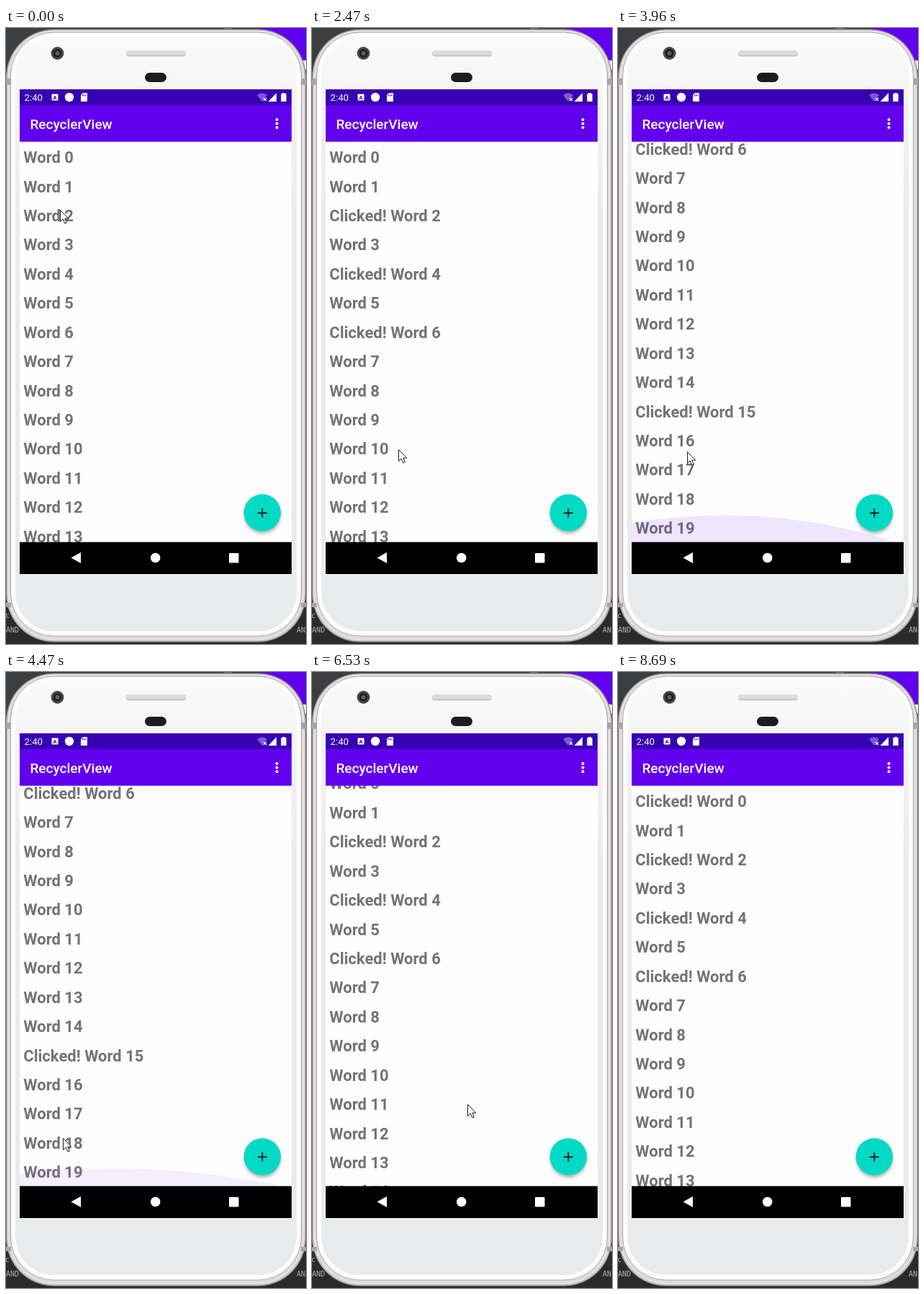
These frames come from a looping animation (417x854 px, 9280 ms). An HTML page:

```html
<!DOCTYPE html>
<html lang="en">
<head>
<meta charset="utf-8">
<title>RecyclerView</title>
<style>
  html, body { margin: 0; width: 100%; height: 100%; overflow: hidden; background: #2b2b2b; }
  svg { display: block; width: 417px; height: 854px; font-family: Roboto, sans-serif; }
  .row { font-size: 22px; font-weight: 700; fill: #737373; }
  .console { font: 10px "DejaVu Sans Mono", monospace; fill: #a9b0b6; }
</style>
</head>
<body>
<svg viewBox="0 0 417 854">
  <defs>
    <linearGradient id="face" x1="0" y1="0" x2="0" y2="1">
      <stop offset="0" stop-color="#fafafa"/>
      <stop offset=".1" stop-color="#f4f4f4"/>
      <stop offset=".3" stop-color="#e9ebec"/>
      <stop offset="1" stop-color="#e8eaeb"/>
    </linearGradient>
    <clipPath id="listArea"><rect x="19" y="157" width="378" height="556"/></clipPath>
    <filter id="blur" x="-30%" y="-30%" width="160%" height="160%"><feGaussianBlur stdDeviation="2.2"/></filter>
  </defs>

  <!-- desktop behind the phone -->
  <rect width="417" height="854" fill="#2b2b2b"/>
  <rect width="417" height="100" fill="#3c3f41"/>
  <rect x="353" width="64" height="45" fill="#6200ee"/>
  <rect x="405" y="45" width="12" height="13" fill="#fafafa"/>
  <g class="console">
    <text x="-1" y="818">c</text><text x="0" y="838">AND</text><text x="404" y="838">AN</text>
  </g>

  <!-- phone body -->
  <rect x="303" y="0" width="11" height="6" fill="#6d6969"/>
  <rect x=".5" y="2" width="416" height="849" rx="66" fill="#c9c4c4" stroke="#817c7c"/>
  <rect x="3" y="4" width="411" height="844" rx="64" fill="#dfdbdb" stroke="#f2efef"/>
  <path d="M0 70H7V79H0zM410 70H417V79H410zM0 797H7V803H0zM410 797H417V803H410z" fill="#aaa5a5"/>
  <rect x="6.5" y="6" width="404" height="837" rx="60" fill="#fdfdfd" stroke="#aaa6a6"/>
  <rect x="13" y="11" width="391" height="825" rx="54" fill="url(#face)"/>
  <circle cx="71.5" cy="35" r="9" fill="#4a4a4c"/>
  <circle cx="71.5" cy="35" r="6" fill="#1f2023"/>
  <circle cx="71.5" cy="35" r="3" fill="#56616c"/>
  <rect x="167" y="31.5" width="83" height="8" rx="4" fill="#c4c5c6"/>
  <rect x="167.5" y="32" width="82" height="5.5" rx="2.7" fill="#dcddde"/>
  <rect x="193" y="62" width="30" height="13" rx="6.5" fill="#1e1b20"/>

  <!-- list -->
  <rect x="19" y="157" width="378" height="556" fill="#fefefe"/>
  <g clip-path="url(#listArea)">
    <g id="list"></g>
    <path id="bottomGlow" fill="#6200ee"/>
    <path id="topGlow" fill="#6200ee"/>
  </g>

  <!-- status bar -->
  <rect x="19" y="85" width="378" height="22" fill="#3700b3"/>
  <g fill="#fff">
    <text x="25.6" y="101" font-size="13.2">2:40</text>
    <rect x="63.5" y="91.5" width="9" height="9" rx="1"/>
    <text x="68" y="99" font-size="8" font-weight="700" text-anchor="middle" fill="#3700b3">A</text>
    <circle cx="88" cy="96" r="6.2"/>
    <path d="M107 90H112Q113 90 113 91V101Q113 102 112 102H105Q104 102 104 101V93z"/>
    <path d="M106.5 92v2.5M108.7 92v2.5M110.9 92v2.5" stroke="#3700b3"/>
    <path d="M349 93Q356 87.5 363 93L356 102z" opacity=".35"/>
    <path d="M358 97l4 4m0-4l-4 4" stroke="#fff" stroke-width="1.2"/>
    <path d="M376 90V102H364.5z"/>
    <path d="M384 90h4v1.3h1.7V102h-7.4V91.3H384z"/>
  </g>

  <!-- app bar -->
  <rect x="19" y="107" width="378" height="50.7" fill="#6200ee"/>
  <text x="33.4" y="139.7" font-size="19" font-weight="500" fill="#fff">RecyclerView</text>
  <g fill="#fff">
    <circle cx="376.5" cy="127" r="2"/><circle cx="376.5" cy="132.5" r="2"/><circle cx="376.5" cy="138" r="2"/>
  </g>

  <!-- add button -->
  <circle cx="356.5" cy="675.5" r="25.5" opacity=".28" filter="url(#blur)"/>
  <circle cx="356.3" cy="672" r="25.8" fill="#03dac6"/>
  <path d="M349.9 672.3h12.8M356.3 665.9v12.8" stroke="#111" stroke-width="1.8"/>

  <!-- navigation bar -->
  <rect x="19" y="712.7" width="378" height="44.3"/>
  <g fill="#fff">
    <path d="M90.5 734.5L104 727V742z"/>
    <circle cx="207.7" cy="734.5" r="6.8"/>
    <rect x="310" y="728" width="13.5" height="13.5" rx="1"/>
  </g>

  <path id="cursor" d="M.5 .5V16.5L4.2 13L6.8 19L9.3 18L6.8 12.2H11.8z" fill="#fff" stroke="#1c1c2a"/>
</svg>

<script>
const LOOP = 9280, REFRESH = 130, ROWS = 20, PITCH = 40.42, BASELINE = 187.2;
const $ = id => document.getElementById(id);

// Each gesture moves the pointer through evenly timed points.
const gestures = [
  { start: 0, duration: 1, path: [[75, 252], [75, 252]] },
  { start: 370, duration: 760, path: [[75, 252], [190, 288], [146, 344]] },
  { start: 1400, duration: 520, path: [[146, 344], [130, 420]] },
  { start: 2230, duration: 130, path: [[130, 420], [120, 584]] },
  { start: 2620, duration: 390, path: [[120, 584], [116, 511]] },
  { start: 3390, duration: 1080, path: [[116, 511], [100, 640], [92, 520], [79, 646]] },
  { start: 4470, duration: 910, path: [[79, 646], [84, 690], [84, 690], [240, 357]] },
  { start: 5990, duration: 520, path: [[230, 376], [216, 599]] },
  { start: 6640, duration: 260, path: [[216, 599], [218, 512]] },
  { start: 7100, duration: 910, path: [[218, 512], [150, 102], [90, 175], [224, 343]] },
  { start: 8150, duration: 520, path: [[224, 343], [372, 860]] }
];
const clickTimes = { 2: 370, 4: 1400, 6: 1790, 15: 3270, 19: 4730, 0: 7750 };

const ramp = (t, start, end) => Math.min(1, Math.max(0, (t - start) / (end - start)));

function pointerAt({ start, duration, path }, t) {
  const u = ramp(t, start, start + duration) * (path.length - 1);
  const i = Math.min(path.length - 2, Math.floor(u));
  return path[i].map((v, axis) => Math.round(v + (path[i + 1][axis] - v) * (u - i)));
}

const scrollAt = t =>
  244 * ramp(t, 2750, 3010) + 10 * ramp(t, 3520, 3780) - 254 * ramp(t, 5990, 6566);

// Overscroll glow: quick rise, slow fade.
const pullAt = (t, start, end) =>
  ramp(t, start, start + REFRESH) * Math.sqrt(1 - ramp(t, start, end));

function drawGlow(path, x, edge, direction, pull) {
  path.setAttribute("d", `M${x - 240} ${edge}Q${x} ${edge + direction * 80 * pull} ${x + 240} ${edge}z`);
  path.setAttribute("opacity", .1 * pull);
}

const rows = Array.from({ length: ROWS }, (_, i) => {
  const row = document.createElementNS("http://www.w3.org/2000/svg", "text");
  row.setAttribute("class", "row");
  row.setAttribute("x", 24.3);
  row.setAttribute("y", BASELINE + i * PITCH);
  $("list").append(row);
  return row;
});

function render(now) {
  const time = now % LOOP;
  const gesture = gestures.findLast(g => g.start <= time);
  // The screen only refreshes in steps counted from the start of each gesture.
  const t = gesture.start + Math.floor((time - gesture.start) / REFRESH) * REFRESH;

  rows.forEach((row, i) => {
    const label = (t >= clickTimes[i] ? "Clicked! " : "") + "Word " + i;
    if (row.textContent !== label) row.textContent = label;
  });
  $("list").setAttribute("transform", `translate(0 ${-scrollAt(t)})`);
  drawGlow($("bottomGlow"), 147, 713, -1, pullAt(t, 3780, 4900));
  drawGlow($("topGlow"), 212, 158, 1, pullAt(t, 6566, 7400));
  $("cursor").setAttribute("transform", `translate(${pointerAt(gesture, t)})`);
}

let startTime;
function tick(now) {
  startTime ??= now;
  render(now - startTime);
  requestAnimationFrame(tick);
}
render(0);
requestAnimationFrame(tick);
</script>
</body>
</html>
```
